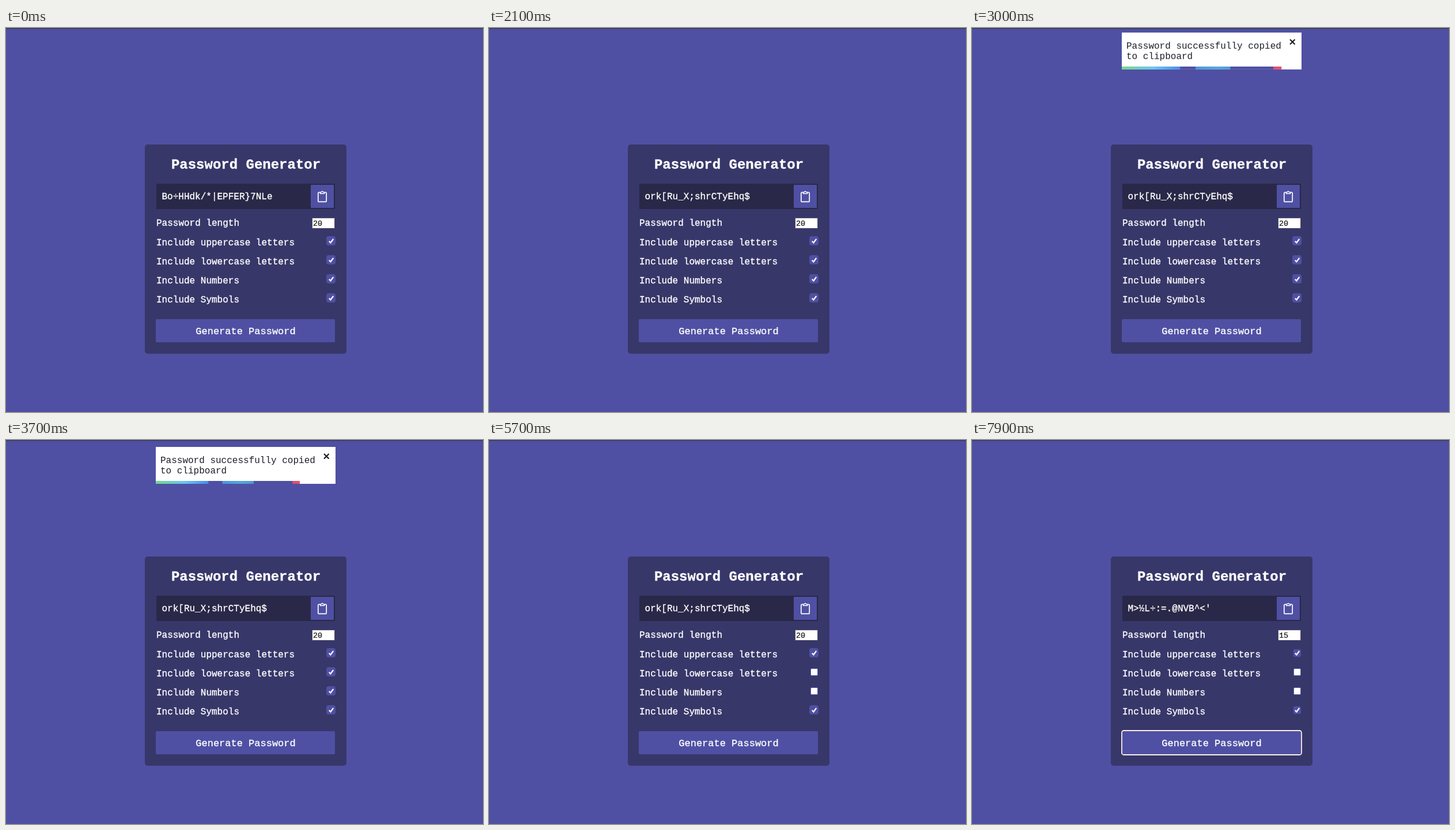
An HTML page for the animation above (8 s loop, 828 by 666 pixels).

```html
<!DOCTYPE html>
<html lang="en">
<head>
<meta charset="utf-8">
<title>Password Generator</title>
<style>
  html, body { margin: 0; width: 100%; height: 100%; overflow: hidden; background: #4f50a3; }
  svg { display: block; }
  text { font: 16px "Liberation Mono", "Courier New", monospace; white-space: pre; }
  .light text { fill: #fff; stroke: #fff; stroke-width: .35px; }
  .light .title { font-size: 24px; font-weight: bold; }
  .light .action { font-size: 17px; }
  .length text { font-size: 13.33px; fill: #111; stroke: #111; stroke-width: .2px; }
  .toast text { fill: #1c1c28; }

  .step { animation: 8s step-end infinite; }
  .first { animation-name: first; }
  .second { animation-name: second; }
  .third { animation-name: third; }
  .len20 { animation-name: len20; }
  .len1 { animation-name: len1; }
  .len15 { animation-name: len15; }
  .lower { animation-name: lower; }
  .numbers { animation-name: numbers; }
  .halo { animation-name: halo; }
  .ring { animation-name: ring; }
  .toast { animation: toast 8s infinite; }
  .bar { transform-origin: 260px 0; animation: bar 8s linear infinite; }

  @keyframes first { 0% { opacity: 1 } 18.75%, 100% { opacity: 0 } }
  @keyframes second { 0% { opacity: 0 } 18.75% { opacity: 1 } 93.75%, 100% { opacity: 0 } }
  @keyframes third { 0% { opacity: 0 } 93.75%, 100% { opacity: 1 } }
  @keyframes len20 { 0% { opacity: 1 } 83.75%, 100% { opacity: 0 } }
  @keyframes len1 { 0% { opacity: 0 } 85% { opacity: 1 } 87.5%, 100% { opacity: 0 } }
  @keyframes len15 { 0% { opacity: 0 } 87.5%, 100% { opacity: 1 } }
  @keyframes lower { 0% { opacity: 1 } 61.25%, 100% { opacity: 0 } }
  @keyframes numbers { 0% { opacity: 1 } 67.5%, 100% { opacity: 0 } }
  @keyframes halo { 0% { opacity: 1 } 92.5%, 100% { opacity: 0 } }
  @keyframes ring { 0% { opacity: 0 } 92.5%, 100% { opacity: 1 } }

  /* drops in with a bounce, later hops and leaves upwards */
  @keyframes toast {
    0%, 27.8625% { transform: translateY(-3000px); animation-timing-function: cubic-bezier(.215, .61, .355, 1) }
    35.3625% { transform: translateY(25px); animation-timing-function: cubic-bezier(.215, .61, .355, 1) }
    37.2375% { transform: translateY(-10px); animation-timing-function: cubic-bezier(.215, .61, .355, 1) }
    39.1125% { transform: translateY(5px); animation-timing-function: cubic-bezier(.215, .61, .355, 1) }
    40.3625%, 46.75% { transform: none }
    48.5% { transform: translateY(-10px) }
    50.25%, 50.6875% { transform: translateY(20px) }
    55.5%, 100% { transform: translateY(-2000px) }
  }
  @keyframes bar {
    0%, 26.375% { transform: scaleX(1) }
    100% { transform: scaleX(.264) }
  }
</style>
</head>
<body>
<svg width="828" height="666" viewBox="0 0 828 666">
  <defs>
    <linearGradient id="rainbow">
      <stop offset="0" stop-color="#74d88a"/>
      <stop offset=".2" stop-color="#6cc4f2"/>
      <stop offset=".365" stop-color="#4a8de8"/>
      <stop offset=".365" stop-color="#4f50a3"/>
      <stop offset=".461" stop-color="#4f50a3"/>
      <stop offset=".461" stop-color="#4f94dc"/>
      <stop offset=".6" stop-color="#56a6d8"/>
      <stop offset=".68" stop-color="#5595d6"/>
      <stop offset=".68" stop-color="#4f50a3"/>
      <stop offset=".95" stop-color="#4f50a3"/>
      <stop offset=".95" stop-color="#d9506e"/>
      <stop offset="1" stop-color="#e8506a"/>
    </linearGradient>
    <g id="tick">
      <rect x="558" y="-6" width="13" height="13" rx="2" fill="#4f50a3"/>
      <path d="M560.8 .8l2.6 2.7 4.8-6.6" fill="none" stroke="#fff" stroke-width="2.2"/>
    </g>
    <rect id="halo" x="556" y="-8" width="16" height="16" rx="4" fill="#4f50a3"/>
    <rect id="empty" x="558.5" y="-5.5" width="12" height="12" rx="1.5" fill="#fff" stroke="#5d5db0"/>
  </defs>

  <rect width="828" height="666" fill="#4f50a3"/>
  <rect x="241" y="202" width="350" height="363" rx="5" fill="#38376a"/>
  <rect x="261" y="270" width="310" height="44" fill="#2a2848"/>
  <rect x="529" y="272" width="40" height="40" rx="1" fill="#4f50a3"/>
  <g fill="none" stroke="#fff" stroke-width="1.7">
    <path d="M545.5 285h-2q-1.7 0-1.7 1.7v13q0 1.7 1.7 1.7h11q1.7 0 1.7-1.7v-13q0-1.7-1.7-1.7h-2"/>
    <path d="M545.5 287.2v-2.6h2q1.5-2.8 3 0h2v2.6z" stroke-width="1.4"/>
  </g>
  <rect x="260" y="505" width="311" height="40" rx="2" fill="#4f50a3"/>
  <rect class="step ring" x="260" y="504" width="312" height="42" rx="3.5" fill="none" stroke="#fbeee6" stroke-width="1.8"/>

  <g class="light">
    <text class="title" x="416.5" y="244" text-anchor="middle">Password Generator</text>
    <text class="step first" x="270.5" y="297">Bo÷HHdk/*|EPFER}7NLe</text>
    <text class="step second" x="270.5" y="297">ork[Ru_X;shrCTyEhq$</text>
    <text class="step third" x="270.5" y="297">M&gt;½L÷:=.@NVB^&lt;'</text>
    <text x="261" y="343">Password length</text>
    <text x="261" y="377">Include uppercase letters</text>
    <text x="261" y="410">Include lowercase letters</text>
    <text x="261" y="443">Include Numbers</text>
    <text x="261" y="476">Include Symbols</text>
    <text class="action" x="416" y="531" text-anchor="middle">Generate Password</text>
  </g>

  <g class="length">
    <rect x="531.5" y="329.5" width="39" height="18" fill="#fff" stroke="#55556e"/>
    <text class="step len20" x="533" y="343">20</text>
    <text class="step len1" x="533" y="343">1</text>
    <text class="step len15" x="533" y="343">15</text>
  </g>

  <g transform="translate(0 369)">
    <use href="#halo" class="step halo"/><use href="#tick"/>
  </g>
  <g transform="translate(0 402)">
    <use href="#empty"/>
    <g class="step lower"><use href="#halo"/><use href="#tick"/></g>
  </g>
  <g transform="translate(0 435)">
    <use href="#empty"/>
    <g class="step numbers"><use href="#halo"/><use href="#tick"/></g>
  </g>
  <g transform="translate(0 468)">
    <use href="#halo" class="step halo"/><use href="#tick"/>
  </g>

  <g class="toast">
    <rect x="260" y="12" width="312" height="64" fill="#fff"/>
    <text x="268" y="40">Password successfully copied</text>
    <text x="268" y="58">to clipboard</text>
    <path d="M552 24l8.5 8.5m0-8.5l-8.5 8.5" stroke="#111" stroke-width="2"/>
    <rect class="bar" x="260" y="71" width="312" height="5" fill="url(#rainbow)"/>
  </g>

  <rect width="828" height="1.6" fill="#3c3b58"/>
</svg>
</body>
</html>
```
